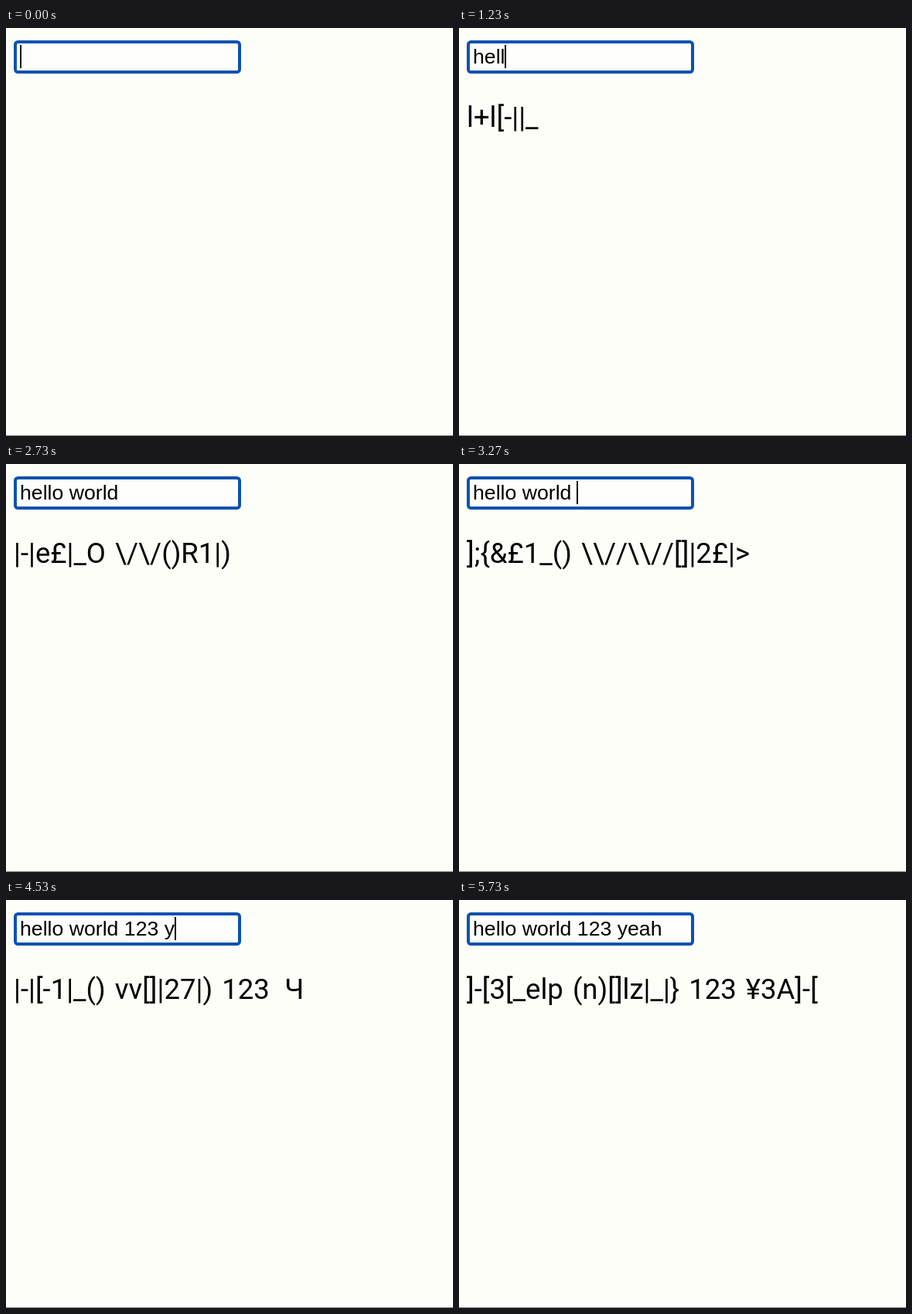
These frames come from a looping animation (578 by 528 pixels, 5760 ms). An HTML page:

```html
<!DOCTYPE html>
<html lang="en">
<head>
<meta charset="utf-8">
<style>
  html, body { margin: 0; width: 100%; height: 100%; overflow: hidden; background: #fefef9; }
  svg { display: block; }
  text { white-space: pre; fill: #000; }
  #typed { font: 26.667px "Liberation Sans", Arial, sans-serif; }
  #output { font: 36.5px Roboto, sans-serif; font-kerning: none; word-spacing: 3px; }
</style>
</head>
<body>
<svg width="578" height="528" viewBox="0 0 578 528">
  <rect width="578" height="528" fill="#fefef9"/>
  <rect x="12" y="18" width="290" height="39" rx="3.5" fill="#fefefa" stroke="#0d52b0" stroke-width="4"/>
  <text id="typed" x="18" y="46"></text>
  <rect id="caret" y="22" width="2" height="30"/>
  <text id="output" x="10" y="128"></text>
  <rect y="527" width="578" height="1" fill="#808080"/>
</svg>
<script>
const LOOP = 5760;
const BLINK = 500;
const PHRASE = "hello world 123 yeah";
const WIDE_CHE = "\u2009Ч\u2009";

// Each keystroke: time in ms and the freshly randomised translation.
const keys = [
  [530, "|-|"],
  [680, "]-[3"],
  [830, "|~|€1"],
  [1230, "l+l[-||_"],
  [1400, "#3|_£0"],
  [1540, "|-|&1|_<> "],
  [1690, "]~[ë|1() \\/\\/"],
  [1830, "1-1e£|_[] vv0"],
  [1950, "]~[££|_Ø dubyaOR"],
  [2090, "]-[3|_1() \\^/o|2|_"],
  [2230, "|-|e£|_O \\/\\/()R1|)"],
  [2900, "];{&£1_() \\\\//\\\\//[]|2£|>"],
  [3330, "|-|3|_7<> \\/\\/0|2£|) 1"],
  [3460, "]~[[-1|_[] (n)O|9|_|} 12"],
  [3590, "l+l&££Ø \\\\//\\\\//o|~1|> 123"],
  [3720, "1-1ë77<> \\^/O|~el|o 123 "],
  [4460, "|-|[-1|_() vv[]|27|) 123 " + WIDE_CHE],
  [4620, "]-[e£|_0 \\/\\/<>R|_|> 123 ¥3"],
  [4760, "|-|E[_£[] \\/\\/<>|9el(| 123 " + WIDE_CHE + "&/-\\"],
  [5100, "]-[3[_elp (n)[]lz|_|} 123 ¥3A]-["]
];

const [typed, caret, output] = ["typed", "caret", "output"].map(id => document.getElementById(id));
const ruler = document.createElement("canvas").getContext("2d");
ruler.font = '26.667px "Liberation Sans", Arial, sans-serif';

function render(t) {
  const count = keys.filter(([time]) => time <= t).length;
  const [lastKey, translation] = count ? keys[count - 1] : [30, ""];
  const text = PHRASE.slice(0, count);
  typed.textContent = text;
  output.textContent = translation;
  caret.setAttribute("x", Math.floor(18 + ruler.measureText(text).width));
  const idle = Math.max(0, t - lastKey);
  const solid = idle % (2 * BLINK) < BLINK;
  caret.setAttribute("visibility", solid ? "visible" : "hidden");
}

const start = performance.now();
function tick() {
  render((performance.now() - start) % LOOP);
  requestAnimationFrame(tick);
}
tick();
</script>
</body>
</html>
```
